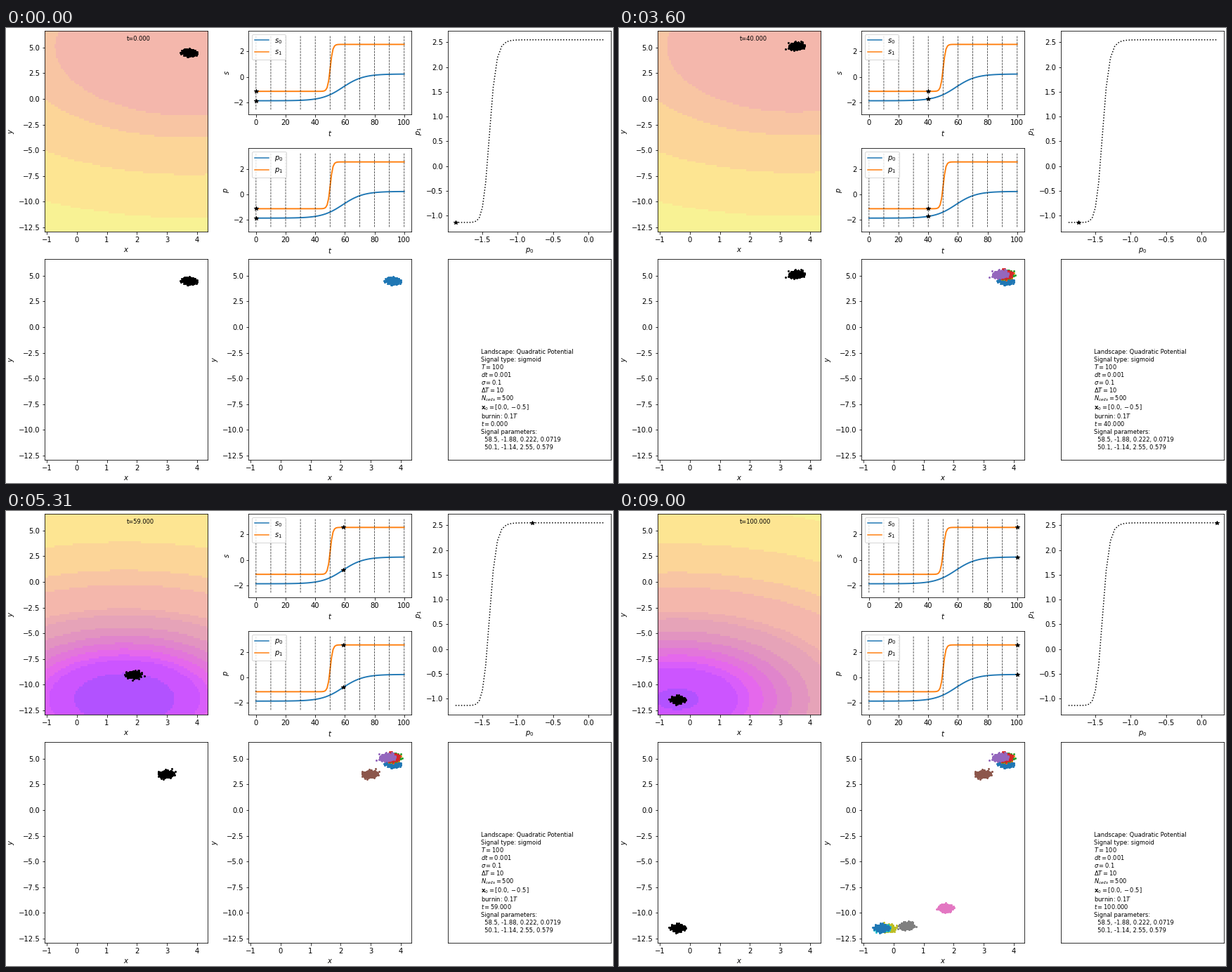
These frames come from a looping animation (864x648 px, 9090 ms). A matplotlib script:

```python
import numpy as np
import matplotlib.pyplot as plt
from matplotlib.animation import FuncAnimation

W, H, DPI = 864, 648, 72
T, BURN, DT, SIGMA, N_CELLS, GAP = 100, 10, 0.05, 0.1, 500, 10
START = (0.0, -0.5)
XLIM, YLIM = (-1.064, 4.363), (-12.91, 6.64)
STIFF = np.array([1 / 2, 2 / 9])
TAB = plt.get_cmap("tab10").colors

# Panel edges in pixels from the top left
COLS = (55.3, 345.3, 629.3)
TOP, MID, LOW, BASE = 3.8, 289.9, 328.8, 614.9

# Colour bands of the potential, from the well outwards
LEVELS = [-14.55, -13.65, -13.2, -12.6, -11.9, -11.0, -9.8, -7.8, -6.5,
          -1.4, 2.4, 11.0, 24.8]
BANDS = np.array([
    (178, 82, 255), (204, 85, 255), (217, 94, 250), (229, 104, 236),
    (226, 118, 218), (224, 133, 204), (226, 148, 192), (230, 163, 184),
    (237, 172, 177), (244, 183, 172), (248, 197, 163), (252, 213, 152),
    (253, 229, 146), (248, 242, 148)]) / 255

plt.rcParams.update({"font.family": "DejaVu Sans", "font.size": 10})


def signal(t):
    """Two sigmoids from a start value to an end value."""
    def sig(tc, lo, hi, rate):
        return lo + (hi - lo) / 2 * (1 + np.tanh(rate * (t - tc)))
    return np.array([sig(58.5, -1.88, 0.222, 0.0719),
                     sig(50.1, -1.14, 2.55, 0.579)])


def simulate():
    """Cell positions at t = 0, 1, ..., T after a burn-in."""
    rng = np.random.default_rng(12)
    pos = np.tile(START, (N_CELLS, 1))
    per_unit = round(1 / DT)

    def advance(pos, t):
        drift = -(STIFF * pos + signal(t))
        return pos + drift * DT + SIGMA * np.sqrt(DT) * rng.normal(size=pos.shape)

    for _ in range(BURN * per_unit):
        pos = advance(pos, 0)
    states = [pos]
    for k in range(T * per_unit):
        pos = advance(pos, k * DT)
        if (k + 1) % per_unit == 0:
            states.append(pos)
    return states


gx, gy = np.meshgrid(np.linspace(*XLIM, 100), np.linspace(*YLIM, 100))


def landscape(p):
    phi = gx**2 / 4 + gy**2 / 9 + p[0] * gx + p[1] * gy
    return BANDS[np.digitize(phi, LEVELS)]


fig = plt.figure(figsize=(W / DPI, H / DPI), dpi=DPI, facecolor="white")


def panel(col, top, bottom, xlabel="", ylabel=""):
    ax = fig.add_axes([COLS[col] / W, 1 - bottom / H, 232 / W, (bottom - top) / H])
    ax.set_xlabel(xlabel)
    ax.set_ylabel(ylabel)
    return ax


def plane(col, top, bottom):
    ax = panel(col, top, bottom, "$x$", "$y$")
    ax.set_xlim(XLIM)
    ax.set_ylim(YLIM)
    return ax


def dots(ax, color):
    return ax.plot([], [], "o", color=color, ms=3, mew=0)[0]


ts = np.arange(T + 1)
path = signal(ts)
cells = simulate()


def time_panel(top, bottom, name):
    ax = panel(1, top, bottom, "$t$", f"${name}$")
    for i in (0, 1):
        ax.plot(ts, path[i], color=TAB[i], lw=1.9)
        ax.plot([], [], color=TAB[i], label=f"${name}_{i}$")
    for t in range(0, T + 1, GAP):
        ax.plot([t, t], [-2.58, 3.22], "k--", lw=0.8, alpha=0.8, snap=False)
    ax.set_ylim(-2.94, 3.63)
    ax.legend(loc="upper left")
    return [ax.plot([], [], "k*", zorder=5)[0] for _ in range(2)]


def write_notes():
    """Fill the info panel upwards; return the line that shows the time."""
    x, y = COLS[2] + 0.2 * 232, 600.4
    lines = [
        "Landscape: Quadratic Potential", "Signal type: sigmoid",
        "$T=100$", "$dt=0.001$", r"$\sigma=0.1$", r"$\Delta T=10$",
        "$N_{cells}=500$", r"$\mathbf{x}_0=[0.0, -0.5]$", "burnin: $0.1T$",
        "$t=0.000$", "Signal parameters:",
        "  58.5, -1.88, 0.222, 0.0719", "  50.1, -1.14, 2.55, 0.579"]
    for line in reversed(lines):
        text = fig.text(x / W, 1 - y / H, line, fontsize="small")
        if line.startswith("$t"):
            timer = text
        tall = "burnin" in line or "mathbf" in line
        y -= 12.8 if tall else 11.1
    return timer


land_ax = plane(0, TOP, MID)
land = land_ax.imshow(landscape(path[:, 0]), origin="lower", aspect="auto",
                      extent=(*XLIM, *YLIM), interpolation="nearest")
live = dots(land_ax, "k")
clock = land_ax.text(0.5, 0.95, "", fontsize="small", transform=land_ax.transAxes)

stars = time_panel(TOP, 122.8, "s") + time_panel(171.2, MID, "p")

param_ax = panel(2, TOP, MID, "$p_0$", "$p_1$")
param_ax.plot(*path, "k:")
param_star = param_ax.plot(*path[:, :1], "k*")[0]

last = dots(plane(0, LOW, BASE), "k")
trail_ax = plane(1, LOW, BASE)
trail = [dots(trail_ax, TAB[k % 10]) for k in range(T // GAP + 1)]
for k, snap in enumerate(trail):
    snap.set_data(*cells[k * GAP].T)

info_ax = panel(2, LOW, BASE)
info_ax.set_xticks([])
info_ax.set_yticks([])
timer = write_notes()


def update(t):
    p = path[:, t]
    land.set_data(landscape(p))
    live.set_data(*cells[t].T)
    clock.set_text(f"t={t:.3f}")
    timer.set_text(f"$t={t:.3f}$")
    for i, star in enumerate(stars):
        star.set_data([t], [p[i % 2]])
    param_star.set_data([p[0]], [p[1]])
    last.set_data(*cells[t // GAP * GAP].T)
    for k, snap in enumerate(trail):
        snap.set_visible(k * GAP <= t)


anim = FuncAnimation(fig, update, frames=T + 1, interval=90, repeat=True,
                     repeat_delay=0, init_func=lambda: update(0), blit=False)
plt.show()
```
